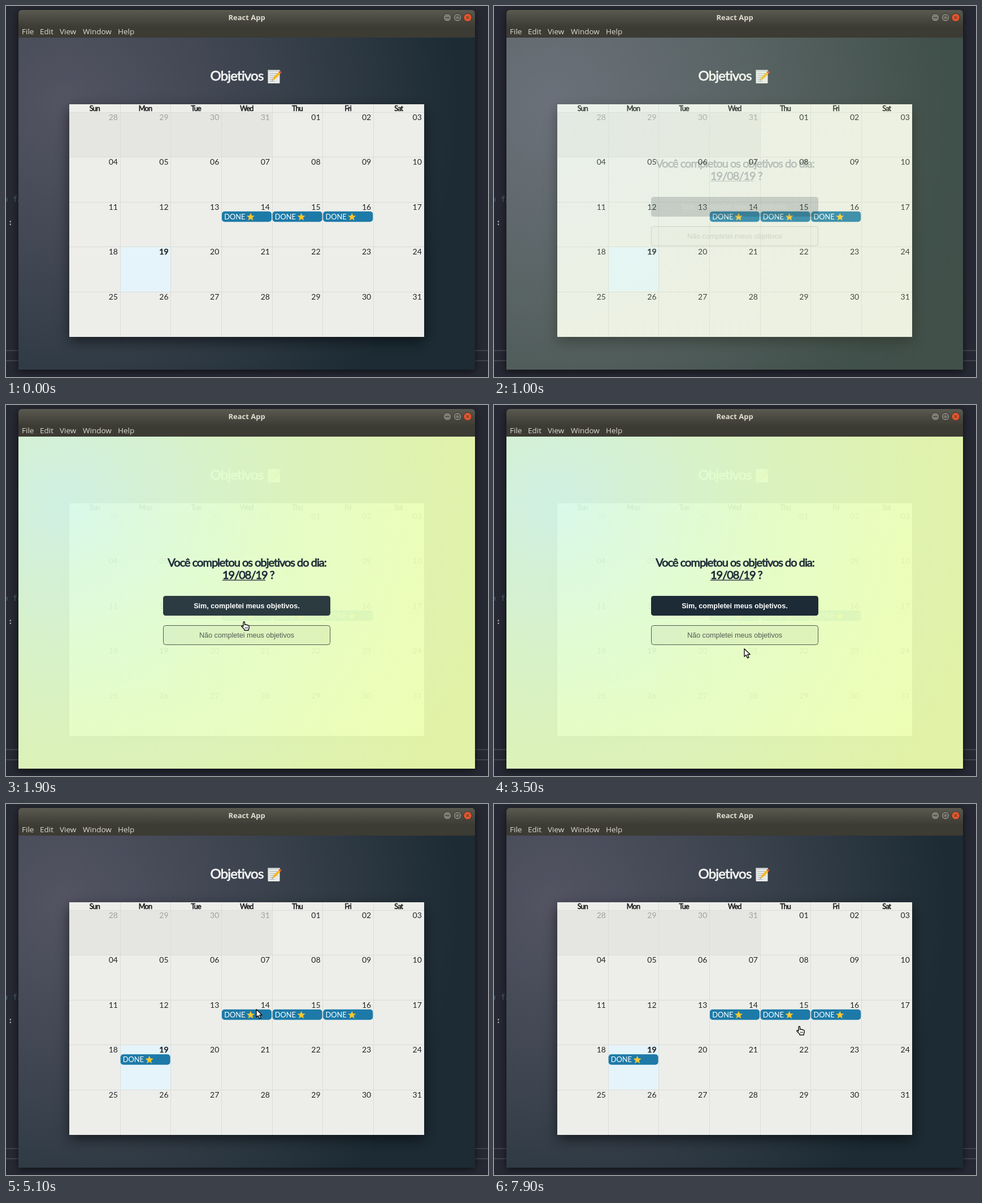
These frames come from a looping animation (853x657 px, 8000 ms). An HTML page with a canvas:

```html
<!DOCTYPE html>
<html lang="pt">
<head>
<meta charset="utf-8">
<title>React App</title>
<style>
  html, body { margin: 0; width: 100%; height: 100%; overflow: hidden; background: #262833; }
  canvas { display: block; }
</style>
</head>
<body>
<canvas id="stage" width="853" height="657"></canvas>
<script>
const ctx = document.getElementById('stage').getContext('2d');
const LOOP = 8000;
const LATO = 'Lato, sans-serif';
const UI = '"Open Sans", "Noto Sans", sans-serif';
const ARIAL = '"Liberation Sans", Arial, sans-serif';
const MONO = '"DejaVu Sans Mono", monospace';
const WIN = { x: 22, y: 7, w: 808, h: 637, top: 56 };
const CAL = { x: 112, y: 174, w: 628, h: 412, head: 188, col: 89.65, row: 79.4 };
const INK = '#1c2b36';

// Pointer path: time, left, top, shape
const POINTER = [
  [0], [1500, 825, 628, 'arrow'], [1600, 752, 560, 'arrow'], [1700, 655, 472, 'arrow'],
  [1800, 570, 395, 'arrow'], [1900, 416, 383, 'hand'], [2000, 490, 330, 'arrow'],
  [2100, 570, 276, 'arrow'], [2300, 500, 270, 'arrow'], [2400, 383, 300, 'arrow'],
  [2500, 415, 400, 'hand'], [2600, 463, 442, 'arrow'], [2800, 457, 440, 'arrow'],
  [2900, 459, 437, 'arrow'], [3000, 463, 438, 'arrow'], [3500, 442, 431, 'arrow'],
  [3700, 439, 416, 'hand'], [3800, 437, 409, 'hand'], [4200, 437, 392, 'hand'],
  [4300, 437, 374, 'hand'], [4400, 437, 363, 'hand'], [5100, 442, 363, 'arrow'],
  [5200, 330, 420, 'arrow'], [5300, 196, 464, 'arrow'], [5500, 225, 456, 'hand'],
  [5600, 275, 444, 'arrow'], [5700, 330, 430, 'arrow'], [5800, 361, 424, 'arrow'],
  [6500, 390, 436, 'arrow'], [6600, 420, 450, 'arrow'], [6700, 385, 453, 'arrow'],
  [6800, 342, 453, 'arrow'], [7000, 327, 440, 'arrow'], [7100, 410, 418, 'arrow'],
  [7200, 530, 396, 'arrow'], [7300, 630, 380, 'arrow'], [7400, 682, 370, 'arrow'],
  [7500, 610, 366, 'hand'], [7600, 561, 368, 'hand'], [7800, 480, 384, 'arrow'],
  [7900, 535, 393, 'hand']
];

function text(str, x, y, font, color, { align = 'left', spacing = 0, heavy = 0 } = {}) {
  ctx.font = font;
  ctx.textAlign = align;
  ctx.letterSpacing = spacing + 'px';
  ctx.fillStyle = ctx.strokeStyle = color;
  ctx.fillText(str, x, y);
  if (heavy) {
    ctx.lineWidth = heavy;
    ctx.lineJoin = 'round';
    ctx.strokeText(str, x, y);
  }
  ctx.letterSpacing = '0px';
}

function rect(x, y, w, h, color) {
  ctx.fillStyle = color;
  ctx.fillRect(x, y, w, h);
}

function roundRect(x, y, w, h, r, fill, stroke) {
  ctx.beginPath();
  ctx.roundRect(x, y, w, h, r);
  if (fill) { ctx.fillStyle = fill; ctx.fill(); }
  if (stroke) { ctx.strokeStyle = stroke; ctx.lineWidth = 1; ctx.stroke(); }
}

function poly(points, fill) {
  ctx.beginPath();
  points.forEach(([x, y]) => ctx.lineTo(x, y));
  ctx.closePath();
  ctx.fillStyle = fill;
  ctx.fill();
}

function shadowed(blur, dy, color, draw) {
  ctx.save();
  ctx.shadowBlur = blur;
  ctx.shadowOffsetY = dy;
  ctx.shadowColor = color;
  draw();
  ctx.restore();
}

// Radial backdrop centred at 10% 20% of the page
function backdrop(radius, ...stops) {
  const g = ctx.createRadialGradient(103, 174, 0, 103, 174, radius);
  stops.forEach(([at, color]) => g.addColorStop(at, color));
  rect(WIN.x, WIN.top, WIN.w, WIN.y + WIN.h - WIN.top, g);
}

function drawDesktop() {
  rect(0, 0, 853, 657, '#262833');
  rect(0, 609.5, 853, 1.5, '#4a4c55');
  rect(0, 627.5, 853, 1.5, '#4a4c55');
  text('o fa', -5, 347, '14px ' + MONO, '#4b616c');
  text(':', 3.5, 388, 'bold 14px ' + MONO, '#a3a7ad');
}

function drawWindow() {
  shadowed(14, 3, 'rgba(0,0,0,.6)', () =>
    roundRect(WIN.x, WIN.y, WIN.w, WIN.h, [6, 6, 0, 0], '#3c3b34'));
  const g = ctx.createLinearGradient(0, 7, 0, 36);
  g.addColorStop(0, '#5b5a50');
  g.addColorStop(1, '#3d3c35');
  roundRect(WIN.x, WIN.y, WIN.w, 30, [6, 6, 0, 0], g);
  text('React App', 426, 25, 'bold 13px ' + UI, '#e0ddd2', { align: 'center' });
  [['File', 28], ['Edit', 60], ['View', 95], ['Window', 136], ['Help', 198]].forEach(([s, x]) =>
    text(s, x, 50, '13.5px ' + UI, '#dfdbd0'));
  [781, 799, 817].forEach((x, i) => {
    ctx.beginPath();
    ctx.arc(x, 20.5, 7.2, 0, Math.PI * 2);
    ctx.fillStyle = i === 2 ? '#e2552f' : '#7d7c72';
    ctx.fill();
    ctx.strokeStyle = '#33322c';
    ctx.lineWidth = 1;
    ctx.stroke();
    ctx.beginPath();
    if (i === 0) { ctx.moveTo(x - 3.5, 20.5); ctx.lineTo(x + 3.5, 20.5); }
    if (i === 1) ctx.rect(x - 3, 17.5, 6, 6);
    if (i === 2) {
      ctx.moveTo(x - 2.5, 18); ctx.lineTo(x + 2.5, 23);
      ctx.moveTo(x + 2.5, 18); ctx.lineTo(x - 2.5, 23);
    }
    ctx.stroke();
  });
}

function drawMemo(x, y) {
  roundRect(x, y + 1, 21, 24, 1, '#e9ebe9');
  rect(x, y + 1, 21, 3, '#c9cfd0');
  for (let i = 0; i < 5; i++) rect(x + 3, y + 7 + i * 3.5, i < 3 ? 14 : 9, 1, '#a9b2b5');
  poly([[x + 7, y + 20], [x + 8.5, y + 15.5], [x + 11.5, y + 18.5]], '#e8c08c');
  poly([[x + 8.5, y + 15.5], [x + 19, y + 5], [x + 22, y + 8], [x + 11.5, y + 18.5]], '#f5b921');
  poly([[x + 19, y + 5], [x + 21.5, y + 2.5], [x + 24.5, y + 5.5], [x + 22, y + 8]], '#d9543f');
  poly([[x + 7, y + 20], [x + 7.6, y + 18.2], [x + 8.8, y + 19.4]], '#4a4038');
}

function drawStar(cx, cy) {
  const pts = Array.from({ length: 10 }, (_, i) => {
    const r = i % 2 ? 3.3 : 7.4, a = i * Math.PI / 5 - Math.PI / 2;
    return [cx + r * Math.cos(a), cy + 0.5 + r * Math.sin(a)];
  });
  poly(pts, '#fcc62f');
}

function drawEvent(col, row) {
  const x = CAL.x + col * CAL.col + 1, y = CAL.head + row * CAL.row + 17;
  roundRect(x, y, 88, 18.5, 5, '#1d7aa8');
  text('DONE', x + 4.2, y + 14, '12.8px ' + LATO, '#fff');
  drawStar(x + 51, y + 9.5);
}

function drawCalendar(done) {
  backdrop(703, [0, '#545463'], [0.5, '#3b434e'], [1, '#1c2b34']);
  text('Objetivos', 361.5, 132, '24px ' + LATO, '#f4f5f4', { spacing: -0.8, heavy: 0.8 });
  drawMemo(463.5, 112);

  const { x, y, w, h, head, col, row } = CAL;
  shadowed(22, 8, 'rgba(0,0,0,.55)', () => rect(x, y, w, h, '#edeeea'));
  rect(x, head, col * 4, row, '#e5e6e2');
  rect(x + col, head + row * 3, col, row, '#e5f4fb');
  for (let c = 1; c < 7; c++) rect(Math.round(x + c * col), y, 1, h, '#dbdcd8');
  for (let r = 0; r < 5; r++) rect(x, Math.round(head + r * row), w, 1, '#dbdcd8');

  ['Sun', 'Mon', 'Tue', 'Wed', 'Thu', 'Fri', 'Sat'].forEach((d, i) =>
    text(d, x + (i + 0.5) * col, 186, '12.6px ' + LATO, '#1d1f20',
      { align: 'center', spacing: -0.8, heavy: 0.6 }));

  for (let i = 0; i < 35; i++) {
    const day = i < 4 ? 28 + i : i - 3;
    text(String(day).padStart(2, '0'), x + (i % 7 + 1) * col - 3.7,
      Math.round(head + Math.floor(i / 7) * row + 14), '14px ' + LATO,
      i < 4 ? '#a0a19e' : '#222425', { align: 'right', heavy: i === 22 ? 0.7 : 0 });
  }
  [3, 4, 5].forEach(c => drawEvent(c, 2));
  if (done) drawEvent(1, 3);
}

function drawPrompt(alpha, button) {
  ctx.save();
  ctx.globalAlpha = alpha * 0.94;
  backdrop(778, [0, '#d8faea'], [0.45, '#e4fdc8'], [1, '#eeffae']);
  ctx.globalAlpha = alpha;
  const head = '20px ' + LATO, style = { spacing: -1, heavy: 0.8 };
  text('Você completou os objetivos do dia:', 426.5, 286, head, INK, { ...style, align: 'center' });
  text('19/08/19 ?', 383, 307.5, head, INK, style);
  rect(383, 309.5, 76, 1.3, INK);
  ctx.globalAlpha = alpha * button;
  roundRect(278, 338, 296, 35, 4.5, INK);
  ctx.globalAlpha = alpha;
  text('Sim, completei meus objetivos.', 426, 360, 'bold 12.6px ' + ARIAL, '#fff', { align: 'center' });
  roundRect(278.5, 390.5, 295, 34, 4, 'rgba(70,80,60,.06)', '#4d5a50');
  text('Não completei meus objetivos', 426, 412, '12.6px ' + ARIAL, '#505c53', { align: 'center' });
  ctx.restore();
}

const SHAPES = {
  arrow: new Path2D('M1 .8 V14.6 L4.2 11.7 L6.6 17 L9 16 L6.7 10.8 H11.2 Z'),
  hand: new Path2D('M4 9.2 V2.2 Q4 .8 5.2 .8 Q6.5 .8 6.5 2.2 V6.2 Q8 5.2 9 6.6 ' +
    'Q10.6 5.8 11.6 7.2 Q14 6.8 14.2 9 V11.5 Q14.2 13 13.2 14.2 V16 H6 V14.6 ' +
    'L1.2 9.6 Q.4 8.4 1.5 7.8 Q2.5 7.4 4 9.2 Z')
};

function drawPointer(t) {
  const [, x, y, shape] = POINTER.findLast(p => p[0] <= t);
  if (!shape) return;
  ctx.save();
  ctx.translate(x, y);
  ctx.fillStyle = '#fff';
  ctx.strokeStyle = '#111';
  ctx.lineWidth = 1.4;
  ctx.lineJoin = 'round';
  ctx.fill(SHAPES[shape]);
  ctx.stroke(SHAPES[shape]);
  if (shape === 'hand') {
    ctx.lineWidth = 0.8;
    ctx.stroke(new Path2D('M7.5 10 V13 M9.5 10 V13 M11.5 10 V13'));
  }
  ctx.restore();
}

// cubic-bezier(.25, .1, .25, 1), solved by bisection
function ease(u) {
  const curve = (a, b, s) => 3 * a * s * (1 - s) ** 2 + 3 * b * s * s * (1 - s) + s ** 3;
  let lo = 0, hi = 1;
  for (let i = 0; i < 20; i++) {
    const mid = (lo + hi) / 2;
    if (curve(0.25, 0.25, mid) < u) lo = mid; else hi = mid;
  }
  return curve(0.1, 1, lo);
}

function buttonAlpha(t) {
  if (t >= 4200) return 1 - 0.08 * Math.min(1, (t - 4100) / 300);
  return t >= 1900 && t < 2000 ? 0.92 : 1;
}

function render(now) {
  const t = Math.floor(now % LOOP / 100) * 100;
  drawDesktop();
  drawWindow();
  if (t >= 500 && t < 700) {
    rect(WIN.x, WIN.top, WIN.w, WIN.y + WIN.h - WIN.top, '#fffffb');
  } else {
    drawCalendar(t >= 5100);
    if (t >= 1000 && t < 5100) drawPrompt(ease(Math.min(1, (t - 850) / 1000)), buttonAlpha(t));
  }
  drawPointer(t);
}

const start = performance.now();
function tick() {
  render(performance.now() - start);
  requestAnimationFrame(tick);
}
tick();
</script>
</body>
</html>
```
